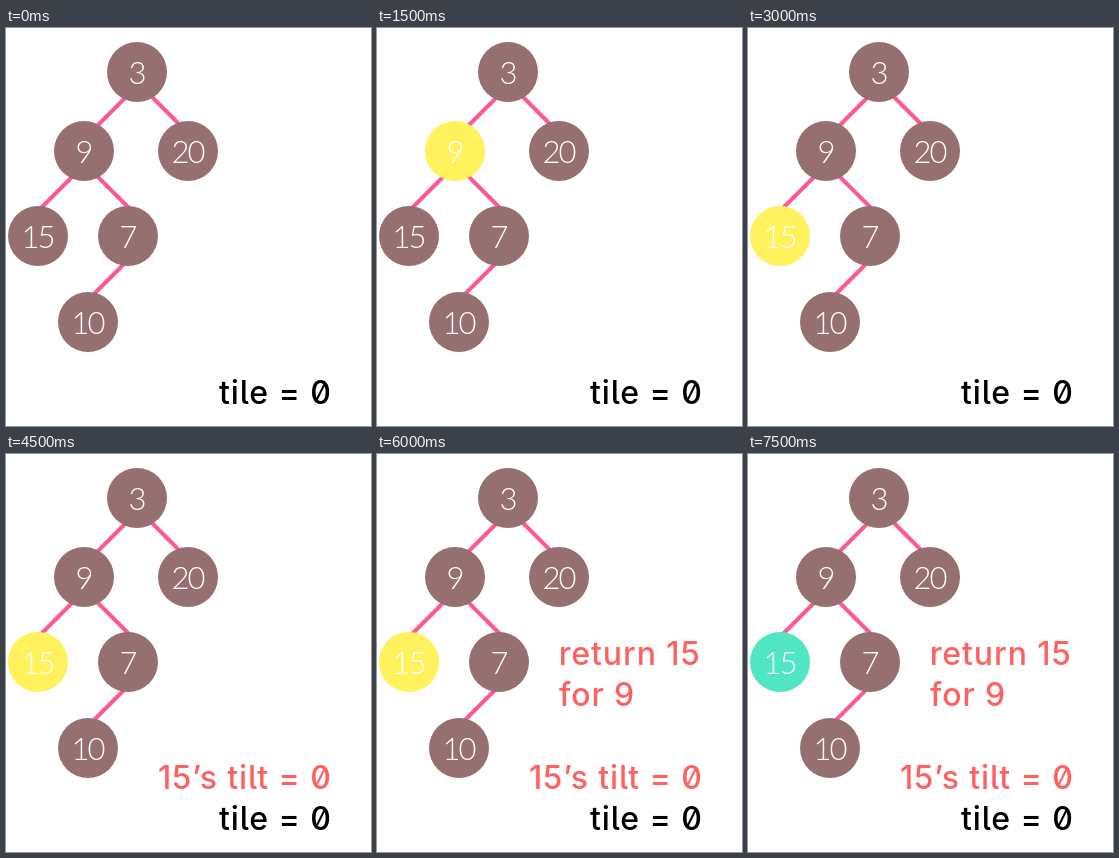
Animation, 365 px wide and 398 px high, one loop 8000 ms. Source, as an HTML page:

```html
<!DOCTYPE html>
<html lang="en">
<head>
<meta charset="utf-8">
<title>Binary tree tilt</title>
<style>
  html, body { margin: 0; width: 100%; height: 100%; overflow: hidden; background: #fff; }
  svg { display: block; width: 365px; height: 398px; }
  .edge { stroke: #ff5a8f; stroke-width: 4; }
  .label {
    font: 300 31px Lato, sans-serif;
    letter-spacing: -2.2px; text-anchor: middle; fill: #fff;
  }
  .note {
    font: 500 32px Inter, sans-serif;
    font-feature-settings: "zero", "cv05";
    letter-spacing: 0.9px;
  }
</style>
</head>
<body>
<svg id="stage" viewBox="0 0 365 398"></svg>
<script>
const LOOP = 8000;
const BROWN = '#967070', YELLOW = '#fff25c', TEAL = '#50e6c4', RED = '#ff6161';
const stage = document.getElementById('stage');

function add(tag, attrs, text) {
  const el = document.createElementNS('http://www.w3.org/2000/svg', tag);
  for (const key in attrs) el.setAttribute(key, attrs[key]);
  if (text) el.textContent = text;
  return stage.appendChild(el);
}

function edge(x1, y1, x2, y2) {
  add('line', { class: 'edge', x1, y1, x2, y2 });
}

function node(value, x, y) {
  const disc = add('circle', { cx: x, cy: y, r: 30, fill: BROWN });
  add('text', { class: 'label', x: x - 0.6, y: y + 11.5 }, value);
  return disc;
}

function note(text, x, y, fill, anchor = 'start') {
  return add('text', { class: 'note', x, y, fill, 'text-anchor': anchor }, text);
}

edge(121, 68, 90, 99);
edge(144, 67, 175, 98);
edge(68, 147, 33, 182);
edge(90, 147, 125, 182);
edge(120, 234, 85, 269);

node('3', 131, 44);
node('20', 182, 123);
node('7', 122, 208);
node('10', 82, 294);
const nine = node('9', 78, 123);
const fifteen = node('15', 32, 208);

note('tile = 0', 325.7, 376, '#000', 'end');
const tilt = note('15’s tilt = 0', 325.7, 335, RED, 'end');
const result = [
  note('return 15', 181.7, 211, RED),
  note('for 9', 182, 252, RED)
];

const show = (el, on) => el.setAttribute('visibility', on ? 'visible' : 'hidden');

function draw(t) {
  nine.setAttribute('fill', t >= 1500 && t < 3000 ? YELLOW : BROWN);
  fifteen.setAttribute('fill', t < 3000 ? BROWN : t < 7500 ? YELLOW : TEAL);
  show(tilt, t >= 4500);
  result.forEach(line => show(line, t >= 6000));
}

let start;
function tick(now) {
  start ??= now;
  draw((now - start) % LOOP);
  requestAnimationFrame(tick);
}
draw(0);
requestAnimationFrame(tick);
</script>
</body>
</html>
```
